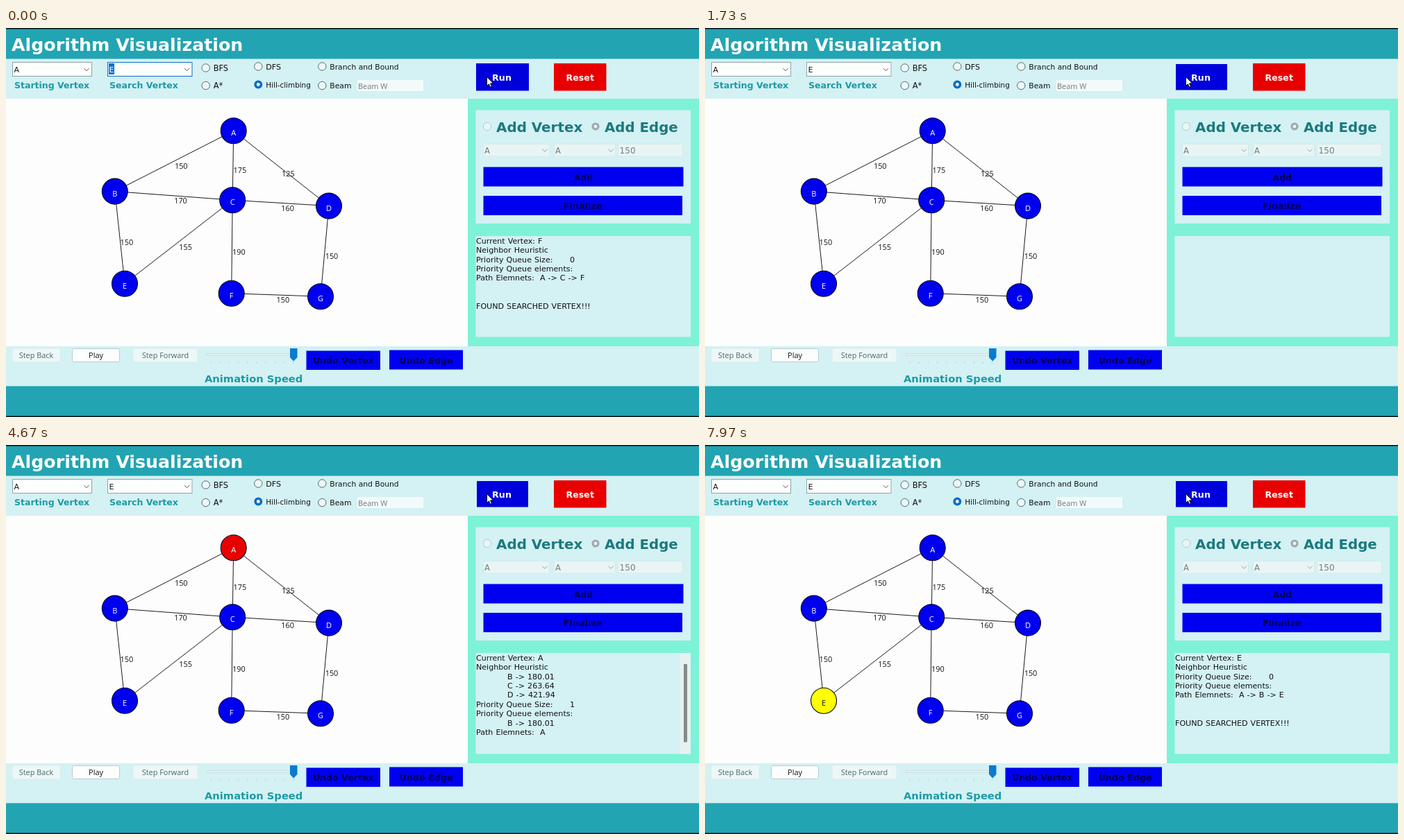
An HTML page with a canvas that plays this animation: 998 px wide and 561 px high, repeating every 8 s.

```html
<!DOCTYPE html>
<html lang="en">
<head>
<meta charset="utf-8">
<title>Algorithm Visualization</title>
<style>
html, body { margin: 0; width: 100%; height: 100%; overflow: hidden; background: #fdfdfd; }
canvas { display: block; }
</style>
</head>
<body>
<canvas id="stage" width="998" height="561"></canvas>
<script>
const ctx = document.getElementById('stage').getContext('2d');
const LOOP = 8000;
const WIDE = '"DejaVu Sans", sans-serif';
const UI = '"Open Sans", "Noto Sans", sans-serif';
const TEAL = '#22a4b3', PALE = '#d4f1f3', MINT = '#7ef2d6', BLUE = '#0000f0';
const INK = '#111', LABEL = '#1c9aa6', NAVY = '#000058', ACCENT = '#0a6fc2';

const vertices = {
  A: [327.7, 148.3], B: [156.8, 235.6], C: [326.2, 248.2], D: [465, 256.6],
  E: [171, 368.7], F: [324.7, 382.7], G: [453, 387.2]
};
const edges = [
  ['A', 'B', 150], ['A', 'C', 175], ['A', 'D', 125], ['B', 'C', 170], ['C', 'D', 160],
  ['B', 'E', 150], ['C', 'E', 155], ['C', 'F', 190], ['D', 'G', 150], ['F', 'G', 150]
];

function report(current, neighbors, queue, path, found) {
  return [
    'Current Vertex: ' + current, 'Neighbor Heuristic', ...neighbors.map(n => '\t' + n),
    'Priority Queue Size:\t\t\t' + queue.length, 'Priority Queue elements:',
    ...queue.map(n => '\t' + n), 'Path Elemnets:  ' + path,
    ...(found ? ['', '', 'FOUND SEARCHED VERTEX!!!'] : [])
  ];
}

// Each step holds until the next one starts.
const steps = [
  { at: 0, log: report('F', [], [], 'A -> C -> F', true) },
  { at: 400, log: [] },
  { at: 2550, mark: 'A', color: '#e80000', scroll: true,
    log: report('A', ['B -> 180.01', 'C -> 263.64', 'D -> 421.94'], ['B -> 180.01'], 'A') },
  { at: 4700, mark: 'B', color: '#e80000',
    log: report('B', ['C -> 263.64', 'E -> 0.00'], ['E -> 0.00'], 'A -> B') },
  { at: 6850, mark: 'E', color: '#ffff00', log: report('E', [], [], 'A -> B -> E', true) }
];
const PRESS = 200, BLUR = 900;

function box(x, y, w, h, fill, stroke) {
  ctx.fillStyle = fill;
  ctx.fillRect(x, y, w, h);
  if (stroke) {
    ctx.strokeStyle = stroke;
    ctx.lineWidth = 1;
    ctx.strokeRect(x + .5, y + .5, w - 1, h - 1);
  }
}

function text(str, x, y, size, color = INK, family = WIDE, weight = 400, align = 'left') {
  ctx.font = `${weight} ${size}px ${family}`;
  ctx.textAlign = align;
  ctx.fillStyle = color;
  ctx.fillText(str, x, y);
}

const bold = (str, x, y, size, color, align) => text(str, x, y, size, color, WIDE, 700, align);

function line(points, color, width = 1) {
  ctx.beginPath();
  points.forEach(p => ctx.lineTo(...p));
  ctx.strokeStyle = color;
  ctx.lineWidth = width;
  ctx.stroke();
}

function disc(x, y, r, fill, stroke, width = 1) {
  ctx.beginPath();
  ctx.arc(x, y, r, 0, Math.PI * 2);
  ctx.fillStyle = fill;
  ctx.fill();
  if (stroke) {
    ctx.strokeStyle = stroke;
    ctx.lineWidth = width;
    ctx.stroke();
  }
}

function polygon(points, fill, stroke) {
  ctx.beginPath();
  points.forEach(p => ctx.lineTo(...p));
  ctx.closePath();
  ctx.fillStyle = fill;
  ctx.fill();
  if (stroke) {
    ctx.strokeStyle = stroke;
    ctx.lineWidth = 1;
    ctx.stroke();
  }
}

const chevron = (x, y, color) => line([[x - 3.5, y - 1.8], [x, y + 1.8], [x + 3.5, y - 1.8]], color);

function radio(label, x, y, size = 11, on = false) {
  if (on) disc(x, y, 4.2, '#fff', ACCENT, 3.6);
  else disc(x, y, 5.7, '#eef8f9', '#53686b');
  text(label, x + 11, y + 4, size);
}

function combo(x, w, value, border) {
  box(x, 49, w, 21, '#fdfefe', border);
  text(value, x + 2.5, 63.5, 11);
  chevron(x + w - 8, 60, '#555');
}

function button(label, x, y, w, h, fill, color, size = 12.6) {
  box(x, y, w, h, fill);
  bold(label, x + w / 2, y + h / 2 + 5, size, color, 'center');
}

function smallButton(label, x, w, enabled) {
  ctx.beginPath();
  ctx.roundRect(x + .5, 462.5, w - 1, 19, 2);
  ctx.fillStyle = enabled ? '#fcfdfd' : '#eef7f7';
  ctx.fill();
  ctx.strokeStyle = enabled ? '#b9cccf' : '#e4f1f1';
  ctx.lineWidth = 1;
  ctx.stroke();
  text(label, x + w / 2, 476, 10.9, enabled ? INK : '#46696d', UI, 400, 'center');
}

function drawControls(t) {
  box(0, 44.5, 998, 57.5, PALE);
  combo(9, 115, 'A', '#8fa3a6');
  combo(146, 122.5, 'E', t < BLUR ? ACCENT : '#8fa3a6');
  if (t < PRESS) {
    box(148, 51, 8, 16, '#0c6fd0');
    text('E', 148.5, 63.5, 11, '#fff');
  }
  bold('Starting Vertex', 12, 87, 12.5, LABEL);
  bold('Search Vertex', 149, 87, 12.5, LABEL);

  radio('BFS', 287.7, 57.5, 11.4);
  radio('A*', 287.7, 83, 11.4);
  radio('DFS', 363.3, 55.5, 11.1);
  radio('Hill-climbing', 363.3, 81.5, 10.4, true);
  radio('Branch and Bound', 455.3, 55.5, 10.75);
  radio('Beam', 455.3, 83, 10.75);
  box(506, 75, 95, 16, '#f3fafa');
  text('Beam W', 507, 87.5, 10.9, '#707b7d', UI);

  const inset = t < PRESS ? 0 : 1;
  box(677 + inset, 51 + inset, 76 - 2 * inset, 39.5 - 2 * inset, '#0000dc');
  bold('Run', 714, 76, 12.7, '#fff', 'center');
  button('Reset', 789, 51, 75.5, 39.5, '#e80000', '#fff', 12.6);
}

function drawGraph(step) {
  box(0, 102, 665, 357, '#fdfdfd');
  for (const [a, b] of edges) line([vertices[a], vertices[b]], '#1a1a1a');
  for (const [a, b, cost] of edges) {
    const [ax, ay] = vertices[a], [bx, by] = vertices[b];
    text(cost, (ax + bx) / 2 + 10, (ay + by) / 2 + 11.2, 10.9, INK, UI, 400, 'center');
  }
  for (const [name, [x, y]] of Object.entries(vertices)) {
    const active = step.mark === name;
    disc(x, y, 18.5, active ? step.color : BLUE, '#000022', 1.1);
    text(name, x, y + 7, 11, active && name === 'E' ? INK : '#fff', UI, 400, 'center');
  }
}

function drawEditor() {
  box(665, 102, 333, 357, MINT);
  box(676.5, 118.5, 309.5, 163.5, PALE);
  disc(693, 142, 5.7, '#e6f6f6', '#b4cacb');
  disc(849, 142, 4, '#eef6f6', '#9eabac', 3.2);
  bold('Add Vertex', 706, 150, 19.9, '#1b7a7e');
  bold('Add Edge', 862, 150, 19.8, '#1b7a7e');

  for (const [x, w] of [[687, 96], [789, 89]]) {
    box(x, 167, w, 18.5, '#e9f5f5', '#d8e9ea');
    text('A', x + 2, 180.5, 11.7, '#74807f');
    chevron(x + w - 7, 176.5, '#8fa0a2');
  }
  box(881, 167, 94, 18.5, '#e9f5f5', '#d8e9ea');
  text('150', 883.5, 181, 12.1, '#74807f');
  button('Add', 687.5, 200.5, 288, 28, BLUE, NAVY, 12.4);
  button('Finalize', 687.5, 242, 286.5, 28, BLUE, NAVY, 12.8);
}

function drawLog(step) {
  box(676.5, 300, 309.5, 145.5, PALE);
  ctx.wordSpacing = '0.5px';
  step.log.forEach((row, i) => {
    // Tab stops are 45 px apart.
    let x = 677;
    const y = 311 + i * 13.37;
    row.split('\t').forEach((part, n) => {
      if (n) x = 677 + n * 45;
      if (part) text(part, x, y, 11.1);
    });
  });
  ctx.wordSpacing = '0px';
  if (step.scroll) {
    box(970, 300, 16, 145.5, '#e6f1f2');
    box(976, 316, 5, 112.5, '#858b8c');
  }
}

function drawPlayback() {
  box(0, 459, 998, 57.5, PALE);
  smallButton('Step Back', 9, 69, false);
  smallButton('Play', 95, 69, true);
  smallButton('Step Forward', 183, 93, false);
  box(289, 469, 126, 4, '#e5eeee', '#cfdfe1');
  for (let i = 0; i < 10; i++) box(294.5 + i * 13.2, 481, 1, 3, '#c0d8da');
  polygon([[409, 462], [419.5, 462], [419.5, 475], [414.2, 480.5], [409, 475]], '#087bd0');
  bold('Animation Speed', 286, 511, 14.7, LABEL);
  button('Undo Vertex', 432.5, 465.5, 106.5, 27.5, BLUE, NAVY, 12.6);
  button('Undo Edge', 552, 464.5, 106, 28, BLUE, NAVY, 12.7);
}

function drawCursor() {
  polygon([[692.5, 70.5], [692.5, 83.5], [695.4, 80.8], [697.4, 85.3],
    [699.5, 84.3], [697.5, 80], [701.5, 79.7]], '#fff', '#080808');
}

function draw(t) {
  const step = steps.findLast(s => s.at <= t);
  box(0, 0, 998, 561, TEAL);
  box(0, 0, 998, 1.5, '#080c0e');
  box(0, 559.5, 998, 1.5, '#080c0e');
  bold('Algorithm Visualization', 8, 33, 25.3, '#fff');
  drawControls(t);
  drawGraph(step);
  drawEditor();
  drawLog(step);
  drawPlayback();
  drawCursor();
}

const start = performance.now();
function tick() {
  draw((performance.now() - start) % LOOP);
  requestAnimationFrame(tick);
}
tick();
</script>
</body>
</html>
```
